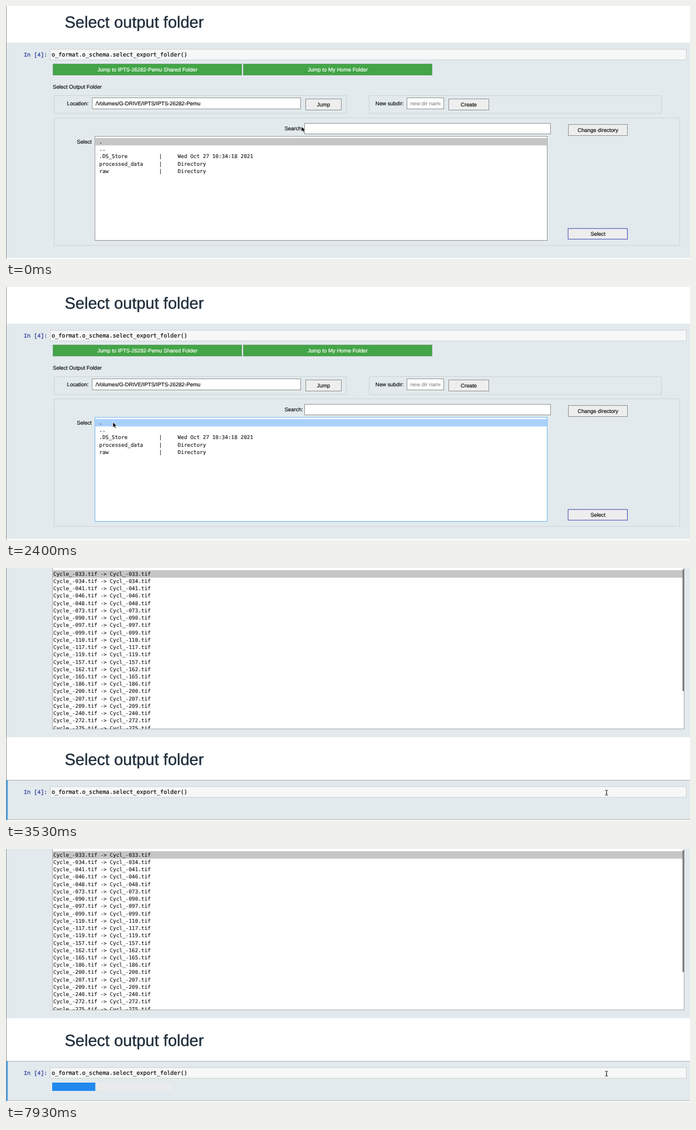
Animation, 1229 px wide and 456 px high, one loop 8000 ms. Source, as an HTML page:

```html
<!DOCTYPE html>
<html lang="en">
<head>
<meta charset="utf-8">
<title>Select output folder</title>
<style>
  html, body { margin: 0; width: 100%; height: 100%; overflow: hidden; background: #fff; }
  svg { display: block; }
  text { font: 9.6px "Liberation Sans", Arial, sans-serif; white-space: pre; text-rendering: geometricPrecision; fill: #111; stroke: #111; stroke-width: .2; }
  .title { font-size: 29px; fill: #212f3d; stroke: #212f3d; stroke-width: .45; }
  .code { font: 10.13px "DejaVu Sans Mono", monospace; fill: #000; }
  .prompt { font: 10.1px "Liberation Mono", monospace; fill: #303f9f; stroke: #303f9f; stroke-width: .3; }
  .list { font: 9.38px "DejaVu Sans Mono", monospace; stroke-width: .1; }
  .white { fill: #fff; stroke: #fff; }
  .hint { fill: #757575; stroke: none; }
  .end { text-anchor: end; }
  .mid { text-anchor: middle; }
</style>
</head>
<body>
<svg id="stage" width="1229" height="456" viewBox="0 0 1229 456"></svg>
<script>
const LOOP = 8000, FPS = 15, ROW = 13.23, SCROLL = 316;
const CELL = '#e2eaed', GREY = '#c6c6c6', EDGE = '#8f8f8f';

const text = (x, y, s, cls = '') => `<text x="${x}" y="${y}" class="${cls}">${s}</text>`;
const fill = (x, y, w, h, color, extra = '') =>
  `<rect x="${x}" y="${y}" width="${w}" height="${h}" fill="${color}" ${extra}/>`;
// Outlined box given by its outer edges, with a crisp 1px border.
const box = (x1, y1, x2, y2, color, line, extra = '') =>
  fill(x1 + .5, y1 + .5, x2 - x1 - 1, y2 - y1 - 1, color, `stroke="${line}" ${extra}`);
const panel = (...edges) => box(...edges, 'none', '#cdd4d8');
const field = (...edges) => box(...edges, '#fff', EDGE);
const button = (x1, y1, x2, y2, label) =>
  box(x1, y1, x2, y2, '#eee', EDGE) + text((x1 + x2) / 2, y1 + 14, label, 'mid');
const green = (x, label) =>
  box(x, 104, x + 340, 125, '#43a547', '#689f6c') + text(x + 170, 118.3, label, 'mid white');

const files = [
  ['.'], ['..'], ['.DS_Store', 'Wed Oct 27 10:34:18 2021'],
  ['processed_data', 'Directory'], ['raw', 'Directory']
].map(([name, info]) => info ? name.padEnd(19) + '|'.padEnd(6) + info : name);

const cycles = ['033', '034', '041', '046', '048', '073', '090', '097', '099', '110', '117', '119',
  '157', '162', '165', '186', '200', '207', '209', '240', '272', '275'];

const chooser = `<g id="chooser">
  ${green(84, 'Jump to IPTS-26282-Pemu Shared Folder')}${green(426, 'Jump to My Home Folder')}
  ${text(84, 148.5, 'Select Output Folder')}
  ${panel(86, 161, 612, 194)}${panel(652, 161, 1178, 194)}${panel(86, 201, 1211, 432)}
  ${text(148.5, 179, 'Location:', 'end')}${field(154.5, 165, 530, 186)}
  ${text(161, 179, '/Volumes/G-DRIVE/IPTS/IPTS-26282-Pemu')}${button(538, 167, 603, 188, 'Jump')}
  ${text(714.5, 179, 'New subdir:', 'end')}${field(720, 165, 787, 186)}
  <g clip-path="url(#hintClip)">${text(726.5, 179, 'new dir name', 'hint')}</g>
  ${button(795, 167, 868, 188, 'Create')}
  ${text(533.5, 224.3, 'Search:', 'end')}${field(536, 211, 979, 231)}
  ${button(1010, 213, 1117, 234, 'Change directory')}
  ${text(154, 247.5, 'Select', 'end')}
  ${box(159.3, 234.5, 973, 423, '#fff', EDGE, 'id="listBox"')}
  ${fill(160.3, 238, 812.2, 13.3, GREY, 'id="listRow"')}
  ${files.map((s, i) => text(167.5, 248 + i * ROW, s, 'list')).join('')}
  ${fill(1010, 403, 108, 20, '#000', 'id="shadow" opacity=".16"')}
  ${box(1009.5, 400.5, 1117, 420.7, '#eee', '#3a43ad', 'id="selectBox"')}${text(1063.5, 414.3, 'Select', 'mid')}
</g>`;

const preview = `<g id="preview">
  ${fill(0, -10, 1232, 315, CELL, 'rx="3"')}
  ${box(83, -10, 1219, 290.5, '#fff', '#a2a2a2')}
  ${fill(83.5, 4, 1135, 13.5, GREY)}
  <g clip-path="url(#previewClip)">
    ${cycles.map((n, i) => text(85, 13.8 + i * ROW, `Cycle_-${n}.tif -> Cycl_-${n}.tif`, 'list')).join('')}
  </g>
  ${fill(1215.5, 2, 3, 220, '#7d7d7d', 'rx="1.5"')}
</g>`;

const cursors = `<g id="cursor">
  <path id="arrow" d="M0 0V9.8L2.3 7.7L3.9 11.2L5.6 10.4L4.1 7.1H7Z" stroke="#fff" stroke-width=".8"/>
  <path id="beam" d="M-2.5 -4.5Q0 -4.5 0 -3Q0 -4.5 2.5 -4.5M0 -3V3M-2.5 4.5Q0 4.5 0 3Q0 4.5 2.5 4.5M-1 1H1" fill="none" stroke="#111"/>
  <path id="hand" d="M-1.8 1V-4.4Q-1 -5.6 -.2 -4.4V-1.5Q.8 -2.2 1.4 -1.2Q2.5 -1.7 3 -.7Q4.4 -.9 4.4 .5V2.6Q4 4 3.4 5.6H-1.4Q-2.4 3.6 -4.2 1.4Q-4.4 .1 -3.2 .2Z" fill="#fff" stroke="#111" stroke-width=".9"/>
</g>`;

document.getElementById('stage').innerHTML = `
  <clipPath id="hintClip">${fill(721, 166, 59.5, 19)}</clipPath>
  <clipPath id="previewClip">${fill(84, 0, 1134, 290)}</clipPath>
  ${preview}
  ${fill(0, 66, 1232, 388, CELL, 'id="cell" rx="3"')}
  ${fill(.8, 66, 2.4, 388, '#42a0e8', 'id="cellMark"')}
  <g id="head">
    ${text(105.5, 39, 'Select output folder', 'title')}
    ${text(32, 91.3, 'In [4]:', 'prompt')}
    ${box(79, 77.5, 1223, 97.7, '#f6f7f7', '#cfcfcf')}
    ${text(82, 91.3, 'o_format.o_schema.select_export_folder()', 'code')}
  </g>
  ${chooser}
  <g id="progress">${fill(83, 421, 217, 15, '#e9ebec')}${fill(83, 421, 0, 15, '#2189ee', 'id="bar"')}</g>
  ${fill(0, 0, .8, 456, '#777')}
  ${cursors}`;

const el = Object.fromEntries([...document.querySelectorAll('[id]')].map(e => [e.id, e]));
const show = (e, on) => e.setAttribute('display', on ? 'inline' : 'none');
const set = (e, attrs) => Object.entries(attrs).forEach(([k, v]) => e.setAttribute(k, v));

// Pointer path: step, x, y
const path = [
  [0, 531, 217], [3, 500, 175], [6, 430, 130], [9, 325, 160], [11, 265, 230], [13, 240, 278],
  [16, 232, 287], [20, 198, 262], [24, 189, 242], [32, 189, 242], [33, 192, 243.5], [36, 192, 243.5],
  [39, 420, 285], [42, 850, 365], [45, 1075, 408], [48, 1080, 410], [52, 1080, 410], [53, 1079, 405]
];
function pointerAt(step) {
  const i = path.findIndex(p => p[0] > step);
  if (i < 0) return path.at(-1).slice(1);
  const [s0, x0, y0] = path[i - 1], [s1, x1, y1] = path[i];
  const k = (step - s0) / (s1 - s0);
  return [x0 + (x1 - x0) * k, y0 + (y1 - y0) * k];
}
const inside = (x, y, x1, y1, x2, y2) => x > x1 && x < x2 && y > y1 && y < y2;

const barTimes = [4330, 4800, 5200, 5730, 6130, 6600, 7070, 7470, 7930];

function draw(t) {
  const step = Math.floor((t + 4) * FPS / 1000);
  const running = step >= 53, selected = step >= 37;
  const focused = step >= 33 && step < 51;
  const hover = step >= 46, pressed = step >= 51;
  const top = running ? 66 + SCROLL : 66;

  show(el.preview, running);
  show(el.chooser, !running);
  show(el.progress, step >= 59);
  el.head.setAttribute('transform', `translate(0 ${running ? SCROLL : 0})`);

  set(el.cell, { y: selected ? top + .5 : top, height: 454 - top - (selected ? 1 : 0), stroke: selected ? '#ababab' : 'none' });
  set(el.cellMark, { y: top, height: 454 - top });
  show(el.cellMark, selected);

  el.listRow.setAttribute('fill', focused ? '#a9d1ff' : GREY);
  el.listBox.setAttribute('stroke', focused ? '#66afe9' : EDGE);
  show(el.shadow, hover);
  el.selectBox.setAttribute('stroke-width', pressed ? 1.7 : 1);

  const done = barTimes.filter(at => t >= at).length;
  el.bar.setAttribute('width', done ? (done + 1) * 7.75 : 0);

  const [x, y] = pointerAt(step);
  const onButton = !running && inside(x, y, 1010, 400, 1117, 421);
  const onField = running || inside(x, y, 155, 165, 530, 186);
  el.cursor.setAttribute('transform', `translate(${x} ${y})`);
  show(el.hand, onButton);
  show(el.beam, onField);
  show(el.arrow, !onButton && !onField);
}

const start = performance.now();
function tick() {
  draw((performance.now() - start) % LOOP);
  requestAnimationFrame(tick);
}
tick();
</script>
</body>
</html>
```
